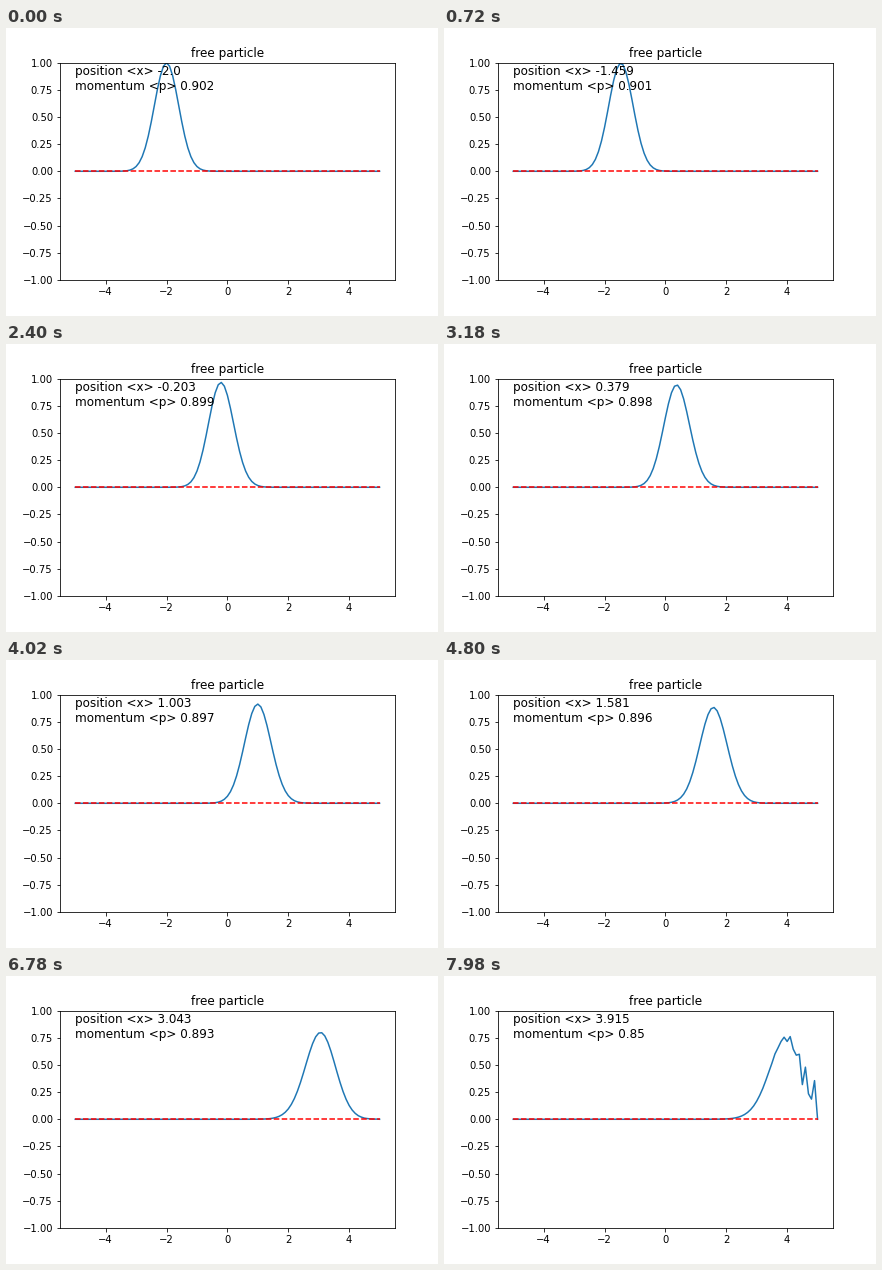
A matplotlib script for the animation above (8 s loop, 432x288 px).

```python
import numpy as np
import matplotlib.pyplot as plt
from matplotlib.animation import FuncAnimation

HBAR, MASS = 0.1, 1.0
DT, SUBSTEPS = 0.001, 50
STEPS, HOLD = 134, 3          # each state is held for three 20 ms ticks
TICKS = 400

x = np.linspace(-5, 5, 101)
dx = x[1] - x[0]


def normalise(psi):
    return psi / np.sqrt(np.sum(np.abs(psi) ** 2) * dx)


def packet(x0=-2.0, sigma=0.4, k=20.0):
    return normalise(np.exp(-((x - x0) / (2 * sigma)) ** 2 + 1j * k * x))


def advance(psi):
    """Explicit Euler steps of the free Schroedinger equation."""
    for _ in range(SUBSTEPS):
        lap = np.zeros_like(psi)
        lap[1:-1] = (psi[2:] - 2 * psi[1:-1] + psi[:-2]) / dx ** 2
        psi = psi + 0.5j * HBAR / MASS * DT * lap
    return normalise(psi)


def measure(psi):
    density = np.abs(psi) ** 2
    pos = np.sum(x * density) * dx
    mom = np.sum(psi.conj() * -1j * HBAR * np.gradient(psi, dx)).real * dx
    return density, round(float(pos), 3), round(float(mom), 3)


states = []
psi = packet()
for _ in range(STEPS):
    states.append(measure(psi))
    psi = advance(psi)

plt.rcParams["font.family"] = "DejaVu Sans"
fig, ax = plt.subplots(figsize=(6, 4), dpi=72)
fig.subplots_adjust(left=0.125, right=0.9, bottom=0.125, top=0.88)
ax.set_title("free particle", fontsize=12)
ax.set_xlim(-5.5, 5.5)
ax.set_ylim(-1, 1)

wave, = ax.plot(x, states[0][0], color="tab:blue")
ax.plot(x, np.zeros_like(x), "r--")
label = ax.text(-5, 0.75, "", fontsize=12)


def update(tick):
    density, pos, mom = states[tick // HOLD]
    wave.set_ydata(density)
    label.set_text(f"position <x> {pos}\nmomentum <p> {mom}")
    return wave, label


anim = FuncAnimation(fig, update, frames=TICKS, interval=20,
                     repeat=True, repeat_delay=0, blit=False)
plt.show()
```
